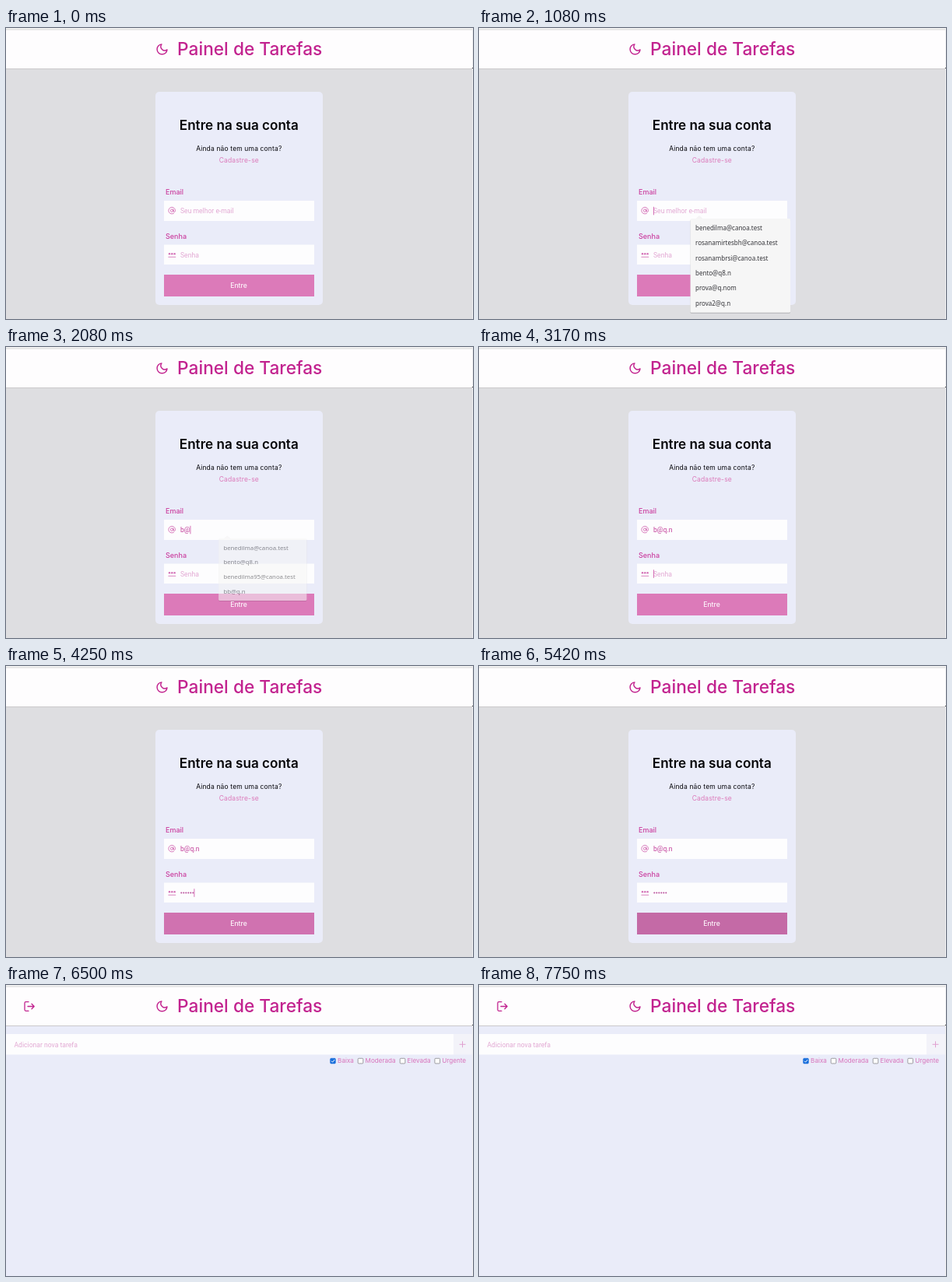
Write an HTML page that moves like this. It is 600 by 374 pixels and loops after 8000 ms.

```html
<!DOCTYPE html>
<html lang="pt-BR">
<head>
<meta charset="utf-8">
<title>Painel de Tarefas</title>
<style>
  html, body { margin: 0; width: 100%; height: 100%; overflow: hidden; background: #dedee1; }
  svg { display: block; width: 100vw; height: 100vh; }
  text { font-family: Inter, sans-serif; white-space: pre; }
  .mid { text-anchor: middle; }
  .title { font-size: 22.7px; font-weight: 500; fill: #c2238f; }
  .h2 { font-size: 17.1px; font-weight: 600; fill: #050508; }
  .small { font-size: 8.5px; letter-spacing: .15px; fill: #08080e; }
  .link { fill: #dc7aba; }
  .label { font-size: 9px; font-weight: 500; fill: #cb3f9f; }
  .button { font-size: 8.7px; font-weight: 500; fill: #fdf6fb; }
  .field { font-family: Roboto, sans-serif; font-size: 8.6px; fill: #c23f9a; }
  .hint { fill: #e2a8d3; }
  .option { font-family: "Noto Sans", sans-serif; font-size: 8px; fill: #36363b; }
  .check { font-size: 8.1px; fill: #d873bb; }
  .icon { fill: none; stroke: #c2238f; stroke-linecap: round; stroke-linejoin: round; }
  .soft { stroke: #cb4fa6; }
</style>
</head>
<body>
<svg viewBox="0 0 600 374" preserveAspectRatio="none">
  <rect width="600" height="374" fill="#dedee1"/>

  <g id="login">
    <rect x="192" y="82" width="215" height="274" rx="5" fill="#eaecf9"/>
    <text class="h2 mid" x="299.3" y="131.3">Entre na sua conta</text>
    <text class="small mid" x="299.3" y="158">Ainda não tem uma conta?</text>
    <text class="small link mid" x="299.3" y="173">Cadastre-se</text>
    <text class="label" x="205" y="214">Email</text>
    <text class="label" x="205" y="270.5">Senha</text>
    <rect x="203" y="222" width="193" height="26" fill="#fdfdfe"/>
    <rect x="203" y="278.5" width="193" height="25.5" fill="#fdfdfe"/>
    <g class="icon soft" transform="translate(208 229.5) scale(.43)" stroke-width="1.7">
      <circle cx="12" cy="12" r="4"/>
      <path d="M16 8v5a3 3 0 0 0 6 0v-1a10 10 0 1 0-3.92 7.94"/>
    </g>
    <g class="icon soft" stroke-width=".7">
      <path d="M208.8 294.3h9"/>
      <path id="stars"/>
    </g>
    <text id="email" class="field" x="224" y="238"></text>
    <text id="hint" class="field hint" x="224" y="294.5">Senha</text>
    <g id="dots" fill="#b9509c"></g>
    <rect id="caret" width=".8" height="10.5" fill="#cb4fa6"/>
    <rect id="button" x="203" y="317" width="193" height="28"/>
    <text class="button mid" x="299" y="334">Entre</text>
    <g id="popup">
      <rect id="shade" x="271.5" y="246" rx="1.5" fill="#000" opacity=".2"/>
      <path d="M278 245.5l5-4.5 5 4.5z" fill="#f4f3f4"/>
      <rect id="panel" x="271.5" y="245" rx="1.5" fill="#f6f6f6"/>
      <g id="options"></g>
    </g>
  </g>

  <g id="board">
    <rect y="52" width="599" height="322" fill="#eaecf9"/>
    <rect y="63" width="575" height="26.5" fill="#fdfdfe"/>
    <rect x="575" y="63" width="24" height="26.5" fill="#f3f3f9"/>
    <text class="field hint" x="10.5" y="79.5">Adicionar nova tarefa</text>
    <path d="M582.5 76.3h8M586.5 72.3v8" stroke="#e0a0d0" stroke-width="1"/>
    <g id="checks"></g>
  </g>

  <rect width="599" height="52" fill="#fefdfe"/>
  <rect width="600" height="1.5" fill="#f4f3f4"/>
  <rect y="1.5" width="600" height="1" fill="#d8d7d8"/>
  <rect y="52" width="600" height="1" fill="#cbc9cb"/>
  <rect x="599" width="1" height="374" fill="#f0f0f2"/>
  <rect x="599" y="51" width="1" height="1" fill="#2a2a2e"/>
  <path class="icon" transform="translate(191.9 18.7) scale(.72)" stroke-width="2"
        d="M21 12.79A9 9 0 1 1 11.21 3 7 7 0 0 0 21 12.79z"/>
  <text class="title" x="220.1" y="35">Painel de Tarefas</text>
  <path id="exit" class="icon" stroke-width="1.3"
        d="M29 21.7h-3.5a1.5 1.5 0 0 0-1.5 1.5v8.6a1.5 1.5 0 0 0 1.5 1.5h3.5M28 27.5h8M33 24.3l3.2 3.2-3.2 3.2"/>
</svg>
<script>
const LOOP = 8000;
const ROW = 19.3;
const $ = id => document.getElementById(id);
const clamp = v => Math.min(1, Math.max(0, v));
const ramp = (t, from, to) => clamp((t - from) / (to - from));
const show = (el, on) => el.setAttribute('display', on ? 'inline' : 'none');

function set(el, attrs) {
  for (const key in attrs) el.setAttribute(key, attrs[key]);
  return el;
}

function add(parent, tag, attrs, text = '') {
  const el = document.createElementNS('http://www.w3.org/2000/svg', tag);
  el.textContent = text;
  parent.appendChild(set(el, attrs));
  return el;
}

const address = 'b@q.n';
const keyTimes = [1580, 2000, 2330, 2500, 2670];
const dotTimes = [3330, 3420, 3580, 3750, 3830, 3920];
const typed = (times, t) => times.filter(at => t >= at).length;

const allOptions = {
  width: 128.5,
  items: ['benedilma@canoa.test', 'rosanamirtesbh@canoa.test', 'rosanambrsi@canoa.test',
    'bento@q8.n', 'prova@q.nom', 'prova2@q.n']
};
const matches = {
  width: 116.5,
  items: ['benedilma@canoa.test', 'bento@q8.n', 'benedilma95@canoa.test', 'bb@q.n']
};

$('stars').setAttribute('d', [210, 213.3, 216.6].map(x =>
  `M${x - 1} 290.3h2M${x - .5} 289.4l1 1.8M${x + .5} 289.4l-1 1.8`).join(''));

const dots = dotTimes.map((_, i) =>
  add($('dots'), 'circle', { cx: 225.3 + i * 3, cy: 291.6, r: 1 }));

[['Baixa', 416.7], ['Moderada', 452.2], ['Elevada', 506.2], ['Urgente', 550.9]].forEach(([name, x], i) => {
  const on = i === 0;
  add($('checks'), 'rect', {
    x, y: 94.3, width: 6.6, height: 6.6, rx: 1,
    fill: on ? '#1a6fdc' : '#fff', stroke: on ? '#1a6fdc' : '#77777c', 'stroke-width': .7
  });
  if (on) add($('checks'), 'path', {
    d: `M${x + 1.3} 97.7l1.5 1.5 2.7-3.2`, fill: 'none', stroke: '#fff', 'stroke-width': 1
  });
  add($('checks'), 'text', { class: 'check', x: x + 9.4, y: 100.2 }, name);
});

let list = null;
function fillPopup(next) {
  if (next === list) return;
  list = next;
  const height = list.items.length * ROW + 5;
  set($('panel'), { width: list.width, height });
  set($('shade'), { width: list.width, height });
  $('options').replaceChildren();
  list.items.forEach((item, i) =>
    add($('options'), 'text', { class: 'option', x: 278, y: 260 + i * ROW }, item));
}

function drawPopup(t) {
  const alpha = t < 1600 ? ramp(t, 950, 1060) : 1 - ramp(t, 1990, 2190);
  show($('popup'), alpha > 0);
  fillPopup(t < 1660 ? allOptions : matches);
  const scale = .94 + .06 * alpha;
  const cx = 271.5 + list.width / 2;
  const cy = 245 + (list.items.length * ROW + 5) / 2;
  set($('popup'), {
    opacity: alpha,
    transform: `translate(${cx} ${cy}) scale(${scale}) translate(${-cx} ${-cy})`
  });
}

function drawFields(t) {
  const count = typed(keyTimes, t);
  const email = $('email');
  email.textContent = count ? address.slice(0, count) : 'Seu melhor e-mail';
  email.setAttribute('class', count ? 'field' : 'field hint');

  const dotCount = typed(dotTimes, t);
  show($('hint'), !dotCount);
  dots.forEach((dot, i) => show(dot, i < dotCount));

  const onEmail = t < 3000;
  const x = onEmail
    ? 224 + (count ? email.getComputedTextLength() : 0)
    : 224 + dotCount * 3 - (dotCount ? .5 : 0);
  set($('caret'), { x, y: onEmail ? 229.8 : 286.3 });
  show($('caret'), t >= 1000 && t < 4330);
}

function drawButton(t) {
  const k = t < 5000 ? ramp(t, 4090, 4420) : 1 - ramp(t, 6200, 6450);
  const mix = [[220, 196], [122, 106], [185, 166]].map(([a, b]) => Math.round(a + (b - a) * k));
  $('button').setAttribute('fill', `rgb(${mix})`);
}

function draw(t) {
  const inside = t >= 6500;
  show($('login'), !inside);
  show($('board'), inside);
  show($('exit'), inside);
  if (inside) return;
  drawFields(t);
  drawButton(t);
  drawPopup(t);
}

const start = performance.now();
function tick() {
  draw((performance.now() - start) % LOOP);
  requestAnimationFrame(tick);
}
tick();
</script>
</body>
</html>
```
